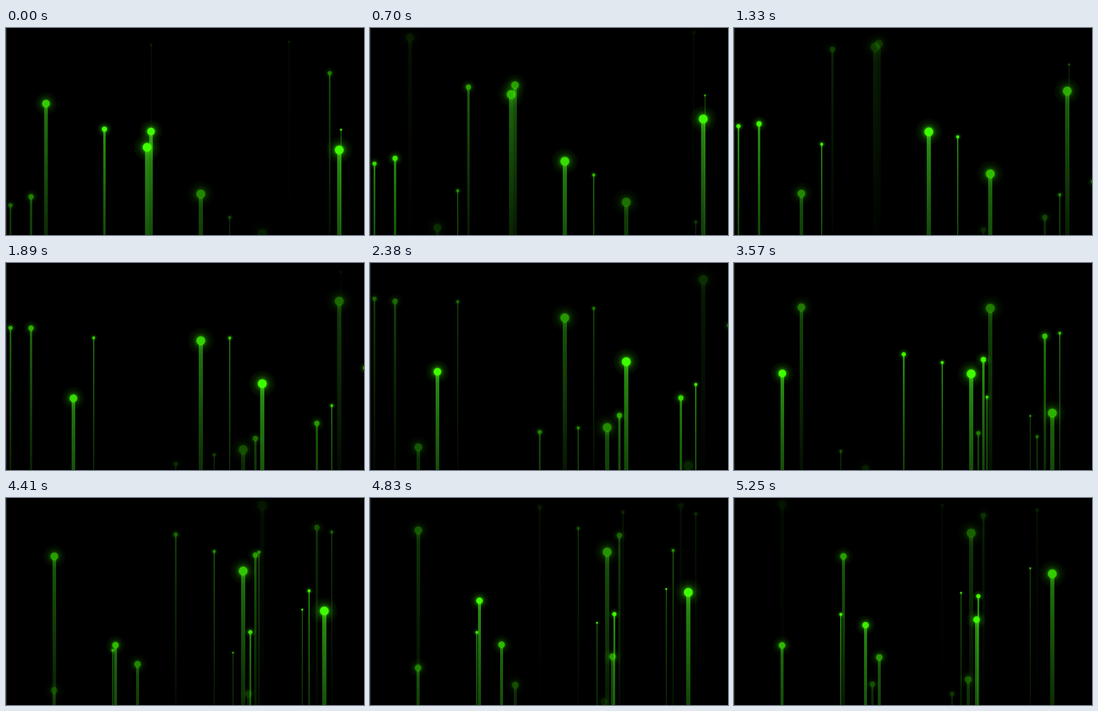
Recreate the animation shown at these times as an HTML page with a canvas. Size 600x348 px, loop 5.32 s.

```html
<!DOCTYPE html>
<html lang="en">
<head>
<meta charset="utf-8">
<title>Rising lights</title>
<style>
  html, body { margin: 0; width: 100%; height: 100%; overflow: hidden; background: #000; }
  canvas { display: block; }
</style>
</head>
<body>
<canvas id="stage" width="600" height="348"></canvas>
<script>
const W = 600, H = 348, LOOP = 5320, STEP = 70;
const LAUNCH_Y = H + 15;          // lights start just below the stage
const GAP = 3 * STEP;             // one launch every third step
const FIRST = -2960;              // the oldest lights are already high at 0 ms
const ctx = document.getElementById('stage').getContext('2d');

// In launch order: left edge, width, speed in px/s
const lights = [
  [541, 3, 97], [474, 1, 123.6], [243, 1, 131.7], [561, 1, 82.4], [555, 7, 74.5],
  [163, 4, 101], [240, 6, 111.2], [64, 6, 158.3], [233, 7, 126.9], [323, 7, 78.5],
  [40, 4, 92.2], [6, 3, 100], [374, 2, 101.7], [426, 7, 75.5], [146, 2, 124.2],
  [545, 2, 72.5], [110, 6, 91], [601, 3, 145.8], [519, 4, 87.3], [416, 4, 79],
  [394, 7, 75.8], [348, 2, 92.3], [283, 3, 109.7], [78, 6, 104.3], [530, 7, 74.3],
  [496, 1, 82.7], [408, 3, 72], [423, 2, 160], [178, 2, 71.8], [507, 2, 161.7],
  [218, 5, 78.1], [380, 1, 119.7], [181, 5, 177.8], [78, 5, 90], [404, 5, 148.2],
  [241, 5, 110.5], [390, 5, 89.2], [230, 4, 113.6], [364, 3, 147.8]
].map(([left, width, speed], i) => ({ left, width, speed, launch: FIRST + i * GAP }));

function fade(gradient, rgb, stops) {
  stops.forEach(([at, a]) => gradient.addColorStop(at, `rgba(${rgb},${a})`));
  return gradient;
}

function drawTail(left, width, top) {
  const length = 345;
  ctx.fillStyle = fade(ctx.createLinearGradient(0, top, 0, top + length),
    '70,255,30', [[0, 0.56], [1, 0]]);
  ctx.fillRect(left, top, width, length);
}

// Solid core and soft halo in one gradient
function drawHead(x, y, r) {
  const reach = r * 3.1, rim = r / reach;
  ctx.fillStyle = fade(ctx.createRadialGradient(x, y, 0, x, y, reach), '64,255,0',
    [[0, 1], [rim * 0.93, 1], [rim * 1.07, 0.45], [rim * 1.4, 0.24], [rim * 2, 0.1], [1, 0.02]]);
  ctx.beginPath();
  ctx.arc(x, y, reach, 0, Math.PI * 2);
  ctx.fill();
}

function drawLight({ left, width, speed, launch }, t) {
  if (t < launch) return;
  const y = LAUNCH_Y - speed * (t - launch) / 1000;
  // Brightest at mid height, gone at both ends
  const alpha = Math.min(1, 1.14 * (1 - Math.abs(y - 181) / 183));
  if (alpha <= 0) return;
  const r = width + 0.3;
  ctx.globalAlpha = alpha;
  drawTail(left, width, y + r * 0.85);
  drawHead(left + width / 2, y, r);
}

function frame() {
  const now = performance.now() % LOOP;
  const t = Math.floor(now / STEP) * STEP;
  ctx.globalAlpha = 1;
  ctx.fillStyle = '#000';
  ctx.fillRect(0, 0, W, H);
  lights.forEach(light => drawLight(light, t));
  ctx.globalAlpha = 1;
  ctx.fillStyle = '#333';
  ctx.fillRect(0, 0, 1, H);
  requestAnimationFrame(frame);
}
frame();
</script>
</body>
</html>
```
